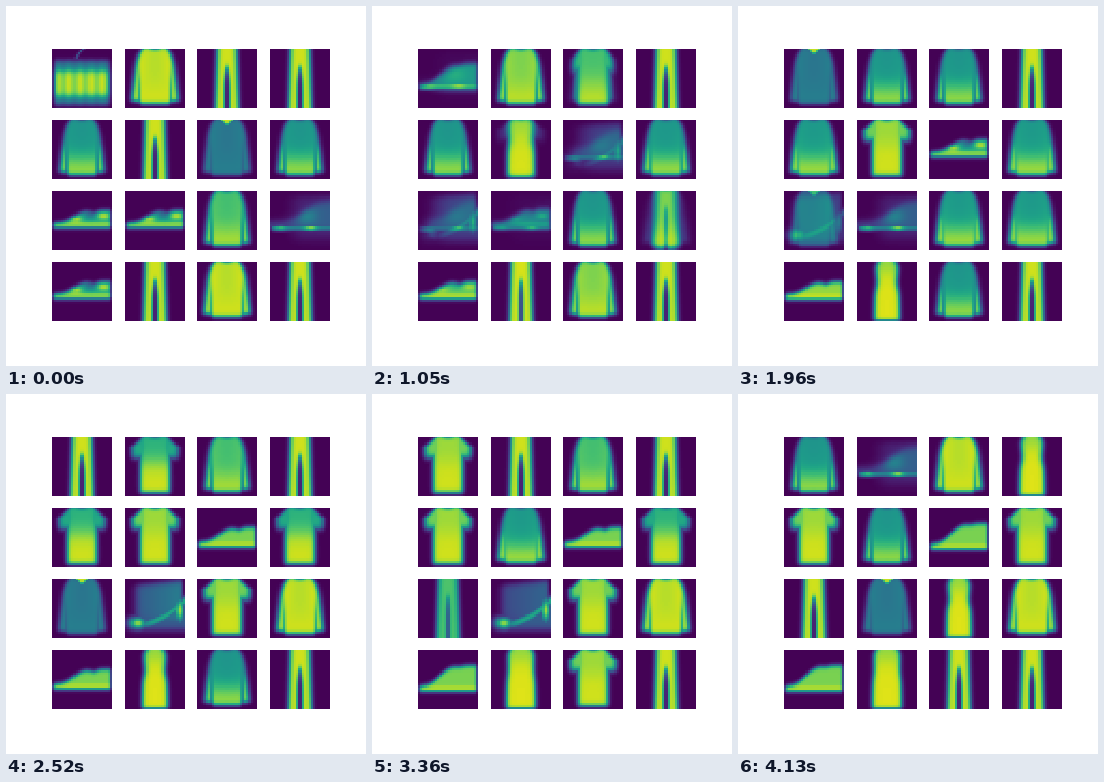
These frames come from a looping animation (360x360 px, 5.25 s). A matplotlib script:

```python
import numpy as np
import matplotlib.pyplot as plt
from matplotlib.animation import FuncAnimation

N = 28
STEP_MS, STEPS, HOLD = 70, 60, 15
KEYS = [0, 9, 20, 28, 36, 48, 59]

Y, X = np.mgrid[0:N, 0:N] + 0.5
AX = abs(X - N / 2)


def soft(d, w=0.55):
    """Smooth step: 0 for d << 0, 1 for d >> 0."""
    return 1 / (1 + np.exp(-np.clip(d / w, -30, 30)))


def bump(d, w):
    return np.exp(-(d / w) ** 2)


def blob(x, y, rx, ry):
    return bump(X - x, rx) * bump(Y - y, ry)


def ramp(lo, hi, mid, w=2.5):
    """Tone that goes down the cell from lo to hi around row mid."""
    return lo + (hi - lo) * soft(Y - mid, w)


def neck():
    return 1 - 0.55 * blob(14, 0, 3, 1.2)


def sleeved(lo, hi, wide=0.0, crease=0.5):
    outer = 4.6 + wide + 3.2 * (1 - np.exp(-Y / 3)) + 0.1 * Y
    seam = 7.2 + 0.6 * wide
    arm = soft(AX - seam) * soft(Y - 10, 1.5)
    body_tone = ramp(lo, hi, 18) + 0.1 * (1 - hi + lo) * (AX / 9) ** 2 * soft(15 - Y, 3)
    tone = body_tone * (1 - arm) + ramp(lo, hi + 0.04, 12) * arm
    fold = 1 - crease * bump(AX - seam, 0.9) * soft(Y - 14, 3)
    hem = soft(26 - Y - 1.3 * arm, 0.5)
    return soft(outer - AX, 0.6) * tone * fold * hem * neck()


def tee(lo, hi):
    outer = np.minimum(5 + 1.1 * Y, 10.7)
    body = soft(np.minimum(outer, 6.9) - AX, 0.6)
    arms = 0.92 * soft(outer - AX, 0.6) * soft(10 - Y, 0.8)
    return np.maximum(body, arms) * ramp(lo, hi, 12) * soft(26.4 - Y) * neck()


def legs(tone, gap):
    half = 4.4 + 0.9 * (Y / N)
    fork = gap * soft(Y - 11, 2.2)
    split = soft(fork - AX, 0.35) * soft(Y - 8.5, 0.8)
    return soft(half - AX, 0.6) * tone * (1 - split)


def dress(half, waist):
    shape = half + 0.8 * soft(Y - 14, 3) - waist * bump(Y - 10, 4) - bump(Y, 2)
    return soft(shape - AX, 0.6) * ramp(0.82, 0.95, 5) * soft(27.5 - Y, 0.4)


def shoe(sole, height, tone, dent=1.0):
    lid = sole - 2.2 - (height - 2.2) * soft(X - 10, 2.6) + dent * bump(X - 19.5, 2.2)
    shape = soft(Y - lid) * soft(sole - Y, 0.5) * soft(X - 0.8, 0.4) * soft(27.2 - X, 0.3)
    glow = 0.14 * bump(Y - sole + 1.5, 1)
    return shape * np.minimum(tone + glow, 0.95)


def sneaker():
    tone = (0.6 + 0.3 * blob(11, 13.5, 3, 1.5) + 0.3 * blob(24, 12, 3, 1.6)
            - 0.2 * blob(18, 11.5, 3, 2) + 0.15 * bump(Y - 16, 1.2))
    return shoe(17.8, 8.4, tone)


def sandal():
    lid = 15 - 10 * soft(X - 16, 3.5)
    veil = (0.2 + 0.16 * blob(17, 12, 5, 4)) * soft(Y - lid, 1) * soft(18 - Y)
    haze = 0.1 * soft(23 - Y, 1.5) * soft(Y - 3, 1) * soft(X - 11, 2)
    shine = 0.46 + 0.24 * bump(X - 5, 2.5) + 0.4 * bump(X - 19, 3)
    band = shine * bump(Y - 17.8, 1.2) * soft(X - 0.8, 0.4)
    return np.maximum(veil + haze, band)


def heel(veil, toe):
    body = veil * (0.7 + 0.5 * X / N) * soft(X - 5, 1) * soft(22 - Y, 1.5)
    body = body * soft(Y - 4 + 0.1 * X, 0.8) * soft(26.5 - X, 0.4)
    ridge = 22 - 0.02 * np.clip(X - 4, 0, N) ** 2
    strap = 0.6 * bump(Y - ridge, 2.2) * soft(X - 7, 2)
    under = 0.3 * soft(Y - ridge) * soft(24 - Y, 1) * soft(X - 2, 1)
    tip = toe * blob(6, 21, 4.2, 2.8)
    back = 0.85 * blob(25.5, 15, 2, 6)
    return np.maximum.reduce([body, strap, under, tip, back])


def bag():
    fringe = 0.42 * soft(Y - 6, 0.7) * soft(26.3 - Y, 0.7)
    core = 0.5 * soft(Y - 10.5, 0.9) * soft(22.5 - Y, 0.9)
    streaks = 1 - 0.06 * (1 + np.cos(1.2 * X))
    strap = 0.25 * bump(X - 11 - 0.12 * (6 - Y) ** 2, 0.8) * soft(6 - Y)
    return np.maximum(soft(12.6 - AX) * (fringe + core) * streaks, strap)


def dim():
    collar = 0.92 * soft(3.8 - AX - 1.2 * Y, 0.5)
    return np.maximum(sleeved(0.39, 0.43, 0.5, 0.25), collar)


ITEMS = {
    "shirt": sleeved(0.52, 0.86),
    "knit": sleeved(0.7, 0.88),
    "pull": sleeved(0.89, 0.93, 0.5, 0.35),
    "loose": sleeved(0.54, 0.88, 0.5, 0.2),
    "tee": tee(0.85, 0.93),
    "faded": tee(0.64, 0.93),
    "pants": legs(0.93, 1.25),
    "slacks": legs(0.95, 0.5),
    "worn": legs(0.72, 0.6),
    "dress": dress(5, 0.6),
    "gown": dress(6, 0.2),
    "sneaker": sneaker(),
    "runner": shoe(18, 8.4, 0.84),
    "low": shoe(18.8, 9.4, 0.8),
    "boot": shoe(19.8, 12.2, 0.8, 0.4),
    "sandal": sandal(),
    "heel": heel(0.36, 0.85),
    "wedge": heel(0.28, 0.85),
    "bag": bag(),
    "dim": dim(),
}
ITEMS["blur"] = 0.75 * ITEMS["dim"] + 0.45 * ITEMS["heel"]

# Items each cell passes through, one per key time; the last one is held.
PATHS = """
bag boot sandal dim pants tee shirt
pull pull knit shirt faded pants sandal
pants tee loose shirt knit knit pull
pants pants pants pants pants pants dress
shirt shirt shirt loose faded tee
pants dress tee tee tee loose shirt
dim heel sandal sneaker low low boot
shirt shirt loose loose faded faded tee
sneaker sandal heel blur dim worn pants
sneaker sneaker sandal sandal heel wedge dim
knit shirt shirt loose tee tee dress
sandal slacks loose loose pull
sneaker sneaker runner runner low boot
pants pants slacks dress dress gown
pull pull knit shirt shirt tee pants
pants
"""


def logit(img):
    v = np.clip(img, 0.004, 0.985)
    return np.log(v / (1 - v))


LOGITS = {name: logit(img) for name, img in ITEMS.items()}
TRACKS = [line.split() for line in PATHS.strip().splitlines()]

fig, axes = plt.subplots(4, 4, figsize=(5, 5), dpi=72)
fig.subplots_adjust(left=0.125, right=0.9, bottom=0.125, top=0.88, wspace=0.2, hspace=0.2)
images = []
for ax in axes.flat:
    ax.axis("off")
    images.append(ax.imshow(np.zeros((N, N)), vmin=0, vmax=1, interpolation="nearest"))


def stop(track, k):
    return LOGITS[track[min(k, len(track) - 1)]]


def update(i):
    pos = np.interp(min(i, STEPS - 1), KEYS, range(len(KEYS)))
    k = int(pos)
    f = pos - k
    for im, track in zip(images, TRACKS):
        mix = (1 - f) * stop(track, k) + f * stop(track, k + 1)
        im.set_data(1 / (1 + np.exp(-mix)))
    return images


anim = FuncAnimation(fig, update, frames=STEPS + HOLD, interval=STEP_MS, repeat=True)
plt.show()
```
